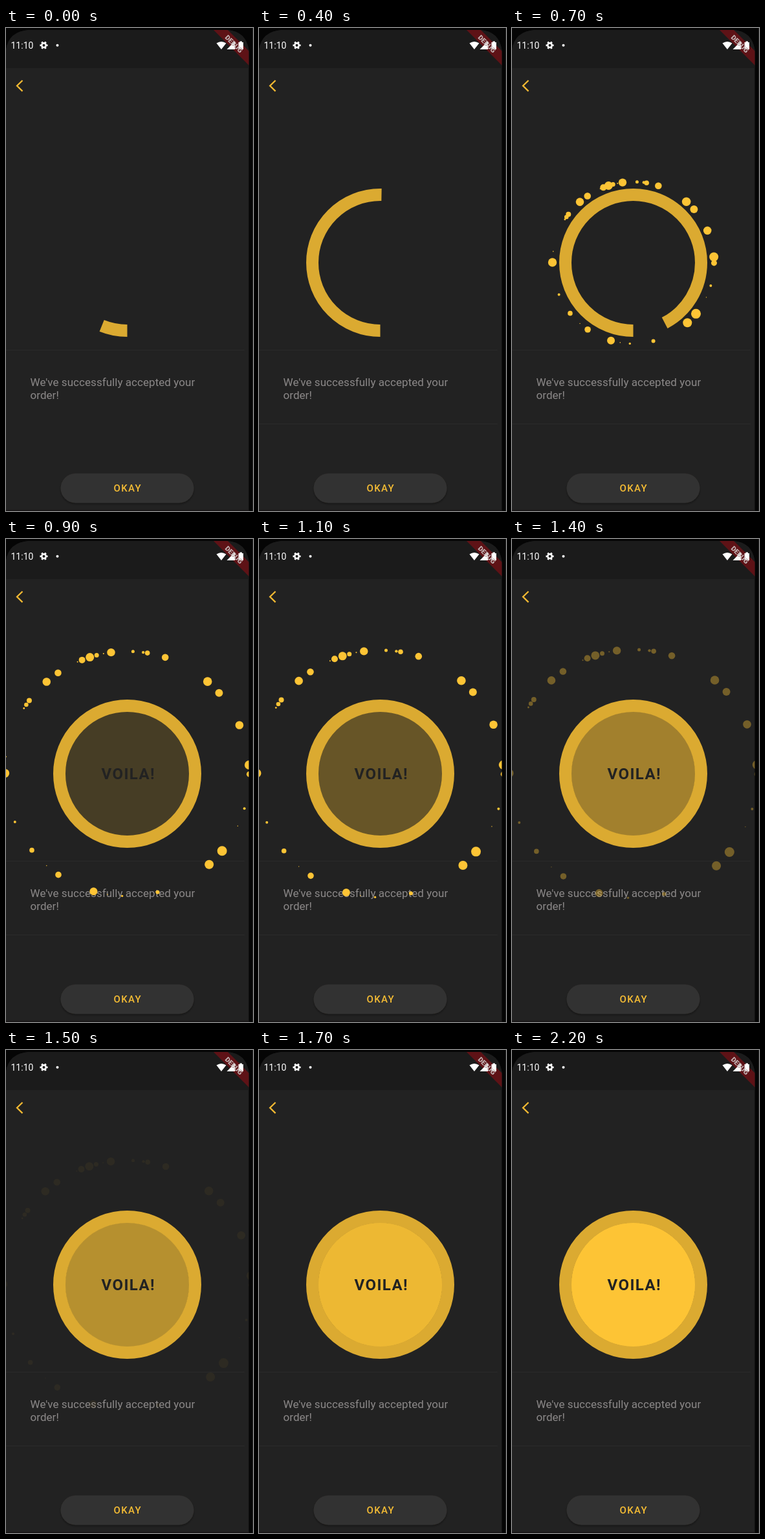
These frames come from a looping animation (382x746 px, 2.3 s). An HTML page:

```html
<!DOCTYPE html>
<html lang="en">
<head>
<meta charset="utf-8">
<title>Order accepted</title>
<style>
  html, body { margin: 0; width: 100%; height: 100%; overflow: hidden; background: #050505; }
  svg { display: block; width: 382px; height: 746px; font-family: Roboto, Inter, sans-serif; }
  .time { font-size: 14px; fill: #fff; }
  .debug { font-size: 10.5px; font-weight: 900; fill: #c4b6b6; text-anchor: middle; }
  .note { font-size: 17px; letter-spacing: .05px; fill: #8b8888; }
  .voila { font-size: 24px; font-weight: 700; letter-spacing: 1.4px; fill: #222; }
  .okay { font-size: 15px; font-weight: 500; letter-spacing: 1.4px; fill: #f6bd34; }
</style>
</head>
<body>
<svg viewBox="0 0 382 746">
  <defs>
    <clipPath id="screen"><path d="M0 746V34Q4 5 36 3H342Q371 5 375.500 34V746Z"/></clipPath>
    <filter id="shadow" x="-10%" y="-30%" width="120%" height="170%">
      <feDropShadow dx="0" dy="2" stdDeviation="1.5" flood-color="#000" flood-opacity=".35"/>
    </filter>
  </defs>

  <rect width="382" height="746" fill="#050505"/>
  <rect x="381" width="1" height="746" fill="#1c1c1c"/>

  <g clip-path="url(#screen)">
    <rect width="376" height="746" fill="#222"/>
    <rect width="376" height="62" fill="#1b1b1b"/>
    <rect y="744.500" width="376" height="2" fill="#161415"/>
    <path d="M321 3H343L376 36V58Z" fill="#5e1216"/>

    <text class="time" x="7.500" y="32">11:10</text>
    <g transform="translate(58.500 26.700)" fill="none" stroke="#fff">
      <circle r="3.300" stroke-width="2.600"/>
      <circle r="5" stroke-width="2.200" pathLength="12" stroke-dasharray="1 1" stroke-dashoffset=".5"/>
    </g>
    <circle cx="79.500" cy="26.700" r="2" fill="#fff"/>
    <g fill="#fff">
      <path d="M325.500 23.500Q333 18.500 340.500 23.500L333 33Z"/>
      <path d="M341.500 33L354 20.500V33Z"/>
      <path d="M359.500 22H361.500V20.500H365V22H367V33H359.500Z"/>
    </g>
    <text class="debug" transform="translate(352.500 24.500) rotate(45)" y="3.700">DEBUG</text>

    <path d="M25.500 81L17 89.300L25.500 97.600" fill="none" stroke="#f3b932" stroke-width="2.300"/>

    <path d="M0 497.500H369" stroke="#2a2a2a"/>
    <path id="rule" d="M0 611.500H369" stroke="#2a2a2a"/>

    <text class="note" x="37.500" y="553">We've successfully accepted your</text>
    <text class="note" x="37.500" y="573">order!</text>

    <rect x="84.500" y="688" width="206" height="45.500" rx="22.750" fill="#333130" filter="url(#shadow)"/>
    <text class="okay" x="166.500" y="716">OKAY</text>

    <g transform="translate(187.500 362.500)">
      <circle id="disc" r="96" fill="#fdc435"/>
      <circle id="ring" r="105" transform="rotate(90)" fill="none" stroke="#dbaa31"
        stroke-width="19" pathLength="360"/>
      <g id="sparks" fill="#fdc435"></g>
    </g>
    <text id="voila" class="voila" x="147.500" y="371">VOILA!</text>
  </g>
</svg>

<script>
const LOOP = 2300, STEP = 100;
const $ = id => document.getElementById(id);

// Each spark: clockwise angle from the top in degrees, dot radius
const SPARKS = [
  [-24, 1], [-21.7, 5], [-17.8, 6.5], [-14.5, 3.5], [-11.2, 1], [-7.6, 6.2],
  [2.7, 2.5], [7.5, 2.2], [9.5, 3.8], [18.1, 5.3], [41.1, 6.8], [48.7, 6],
  [66.6, 6.3], [85.9, 7], [90.2, 4.5], [106.5, 2], [115.3, .7], [129.1, 7.5],
  [137.9, 7], [165.6, 3], [182.4, 1.7], [189.3, .8], [196, 6], [214.3, 4.8],
  [221.3, .7], [231.3, 3.8], [246.8, 2], [270.2, 6.7], [278, .8], [302.3, 1.4],
  [304.3, 3.3], [306.7, 4], [318.7, 6.3], [325.5, 5.3]
];

// Keyframes as [ms, value]
const DISTANCE = [[600, 60], [700, 125], [800, 175], [900, 189], [1000, 190.2], [1200, 191.4], [1500, 192]];
const SPARK_ALPHA = [[600, 0], [700, 1], [1200, 1], [1300, .7], [1500, .05], [1600, 0]];
const DISC_ALPHA = [[750, 0], [900, .16], [1200, .39], [1500, .68], [1700, .93], [1800, 1]];

function sample(keys, t) {
  if (t <= keys[0][0]) return keys[0][1];
  for (let i = 1; i < keys.length; i++) {
    const [t0, v0] = keys[i - 1], [t1, v1] = keys[i];
    if (t <= t1) return v0 + (v1 - v0) * (t - t0) / (t1 - t0);
  }
  return keys[keys.length - 1][1];
}

const dots = SPARKS.map(([, r]) => {
  const dot = document.createElementNS($('sparks').namespaceURI, 'circle');
  dot.setAttribute('r', r);
  return $('sparks').appendChild(dot);
});

function draw(t) {
  const s = t / 100;
  const sweep = 22 + 33.7 * s + 1.52 * s * s;
  $('ring').setAttribute('stroke-dasharray', sweep >= 360 ? 'none' : `${sweep} 400`);
  $('disc').setAttribute('opacity', sample(DISC_ALPHA, t));
  $('rule').setAttribute('opacity', t < 100 ? 0 : 1);
  $('voila').setAttribute('opacity', t < 800 ? 0 : 1);

  const dist = sample(DISTANCE, t);
  $('sparks').setAttribute('opacity', sample(SPARK_ALPHA, t));
  dots.forEach((dot, i) => {
    const a = SPARKS[i][0] * Math.PI / 180;
    dot.setAttribute('cx', dist * Math.sin(a));
    dot.setAttribute('cy', -dist * Math.cos(a));
  });
}

const start = performance.now();
function tick() {
  const t = (performance.now() - start) % LOOP;
  draw(Math.floor(t / STEP) * STEP);
  requestAnimationFrame(tick);
}
tick();
</script>
</body>
</html>
```
